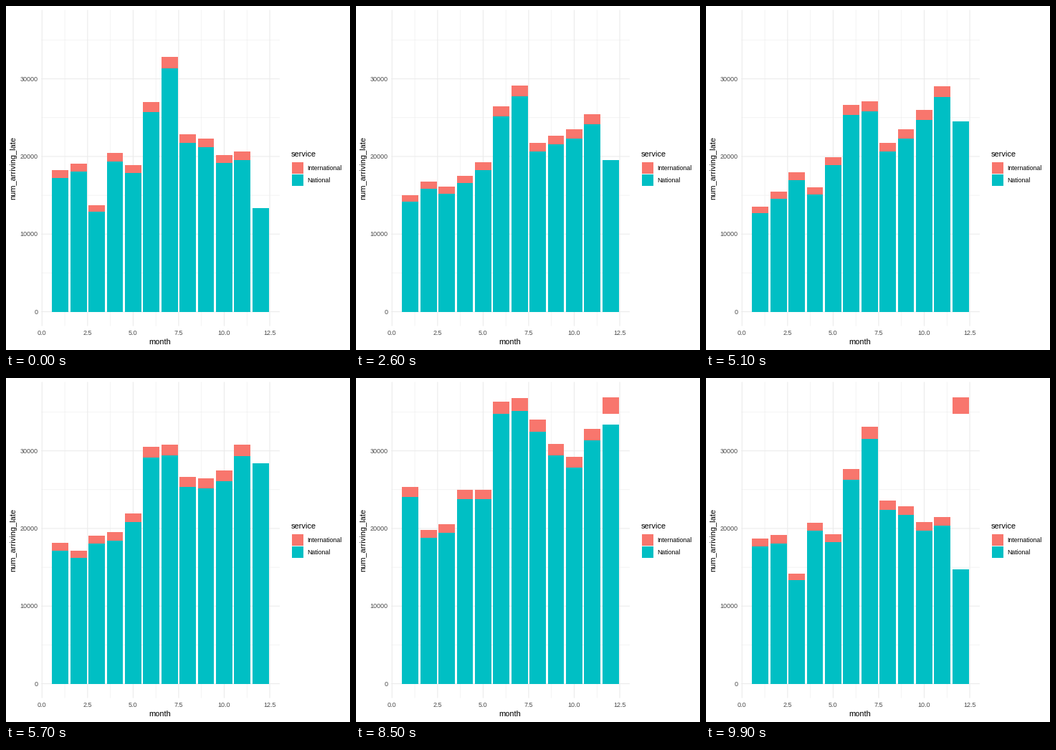
These frames come from a looping animation (480x480 px, 10000 ms). A matplotlib script:

```python
import numpy as np
import matplotlib.pyplot as plt
from matplotlib.animation import FuncAnimation
from matplotlib.patches import Rectangle

plt.rcParams["font.family"] = "Liberation Sans"

SIZE, DPI = 480, 72
RED, TEAL, GRID, GREY = "#F8766D", "#00BFC4", "#EBEBEB", "#4D4D4D"
LEFT, RIGHT, TOP, BOTTOM = 49.16, 381.9, 5.5, 446.55
STEP = 25.42
WIDTH = 0.9 * STEP

# Late arrivals per month, in thousands, one row per year.
YEARS = np.array([
    [18.24, 19.07, 13.72, 20.46, 18.89, 27.01, 32.83, 22.86, 22.3, 20.18, 20.64, 13.35],
    [12.77, 15.19, 17.77, 15.44, 19.56, 26, 26.49, 20.94, 23.01, 25.76, 28.76, 23.88],
    [25.82, 19.86, 21, 25.29, 25.39, 37, 37.03, 34.78, 31.46, 29.83, 33.64, 34.75],
])
LAST_TOP = 36.89  # top of December's international block in the last year

# Each year holds, then glides linearly into the next one.
HOLDS = [0, 16, 33, 50, 67, 84, 100]
PHASES = [0, 0, 1, 1, 2, 2, 3]


def px(month):
    return 50.27 + STEP * month


def py(thousands):
    return 426.55 - 10.83 * thousands


fig = plt.figure(figsize=(SIZE / DPI, SIZE / DPI), dpi=DPI, facecolor="white")
ax = fig.add_axes([0, 0, 1, 1])
ax.set_xlim(0, SIZE)
ax.set_ylim(SIZE, 0)
ax.axis("off")


def hline(value, width):
    ax.plot([LEFT, RIGHT], [py(value)] * 2, color=GRID, lw=width,
            snap=False, solid_capstyle="butt", zorder=1)


def vline(month, width):
    ax.plot([px(month)] * 2, [TOP, BOTTOM], color=GRID, lw=width,
            snap=False, solid_capstyle="butt", zorder=1)


def label(x, y, text, size=9, color="black", ha="left", **kw):
    ax.text(x, y, text, fontsize=size, color=color, ha=ha, va="baseline", **kw)


def box(x, y, w, h, color):
    return ax.add_patch(Rectangle((x, y), w, h, fc=color, ec="none", lw=0,
                                  antialiased=False, zorder=3))


# Grid and tick labels
for k in range(4):
    hline(10 * k + 5, 0.53)
    hline(10 * k, 1.07)
    label(44.5, round(py(10 * k) + 3.2), str(10000 * k), color=GREY, ha="right")
for k in range(6):
    if k < 5:
        vline(2.5 * k + 1.25, 0.53)
    vline(2.5 * k, 1.07)
    label(px(2.5 * k), 459, f"{2.5 * k:.1f}", color=GREY, ha="center")

# Axis titles
label(215, 472, "month", 11, ha="center")
label(13.5, 226, "num_arriving_late", 11, ha="center",
      rotation=90, rotation_mode="anchor")

# Legend
label(397.5, 210, "service", 11)
for y, color, name in ((218, RED, "International"), (235, TEAL, "National")):
    box(399, y, 16, 16, color)
    label(420.4, y + 11, name, 8.8)

lefts = px(np.arange(1, 13) - 0.45)
national = [box(x, py(0), WIDTH, 0, TEAL) for x in lefts]
international = [box(x, py(0), WIDTH, 0, RED) for x in lefts]


def span(bar, low, high):
    bar.set_y(py(high))
    bar.set_height(py(low) - py(high))


def update(i):
    phase = np.interp(i, HOLDS, PHASES)
    year = int(phase)
    mix = phase - year
    total = (1 - mix) * YEARS[year] + mix * YEARS[(year + 1) % 3]
    share = 0.33 + 0.036 * total  # international part
    share[-1] = 0
    for lower, upper, t, s in zip(national, international, total, share):
        span(lower, 0, t - s)
        span(upper, t - s, t)
    # December's block belongs to the last year only and never moves.
    span(international[-1], YEARS[2, -1], LAST_TOP)
    international[-1].set_visible(year == 2)
    return national + international


anim = FuncAnimation(fig, update, frames=100, interval=100,
                     repeat=True, repeat_delay=0, blit=False)
plt.show()
```
